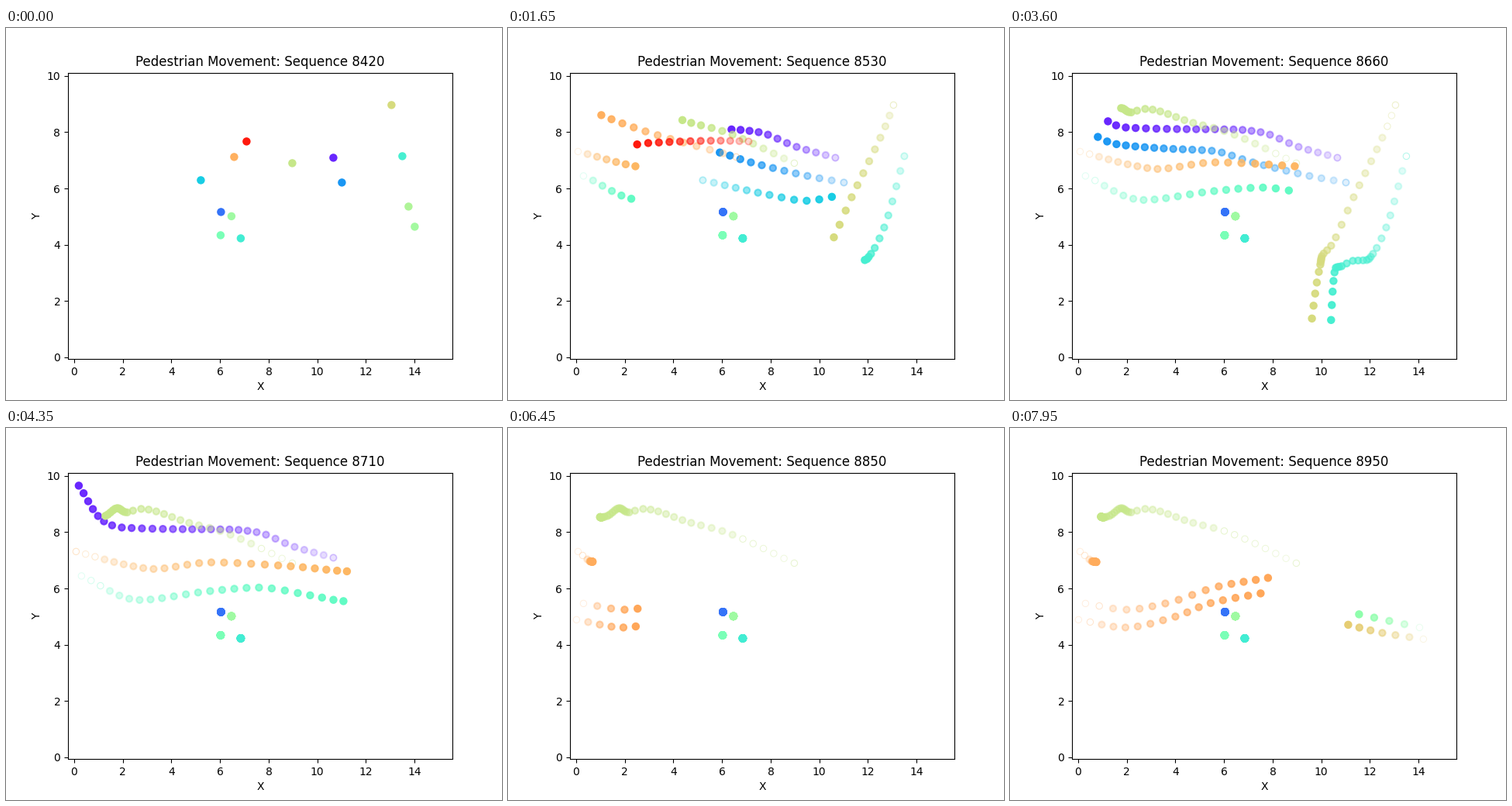
Animation of 640x480 px, one loop 8 s. Source, as a matplotlib script:

```python
import numpy as np
import matplotlib.pyplot as plt
from matplotlib.animation import FuncAnimation

STEPS, TICKS_PER_STEP = 54, 3
FIRST_ID, ID_STEP = 8420, 10
FAINT = 0.11  # paler fills than this leave only an outline


def to_data(px, py):
    """Stage pixels (y down) to axis units."""
    return (np.asarray(px) - 87.9) / 31.38, (424.85 - np.asarray(py)) / 36.3


def glide(t, knots, values):
    """Cubic curve through the knots that never overshoots them."""
    h = np.diff(knots)
    rate = np.diff(values) / h
    total = rate[:-1] + rate[1:]
    inner = 2 * np.maximum(rate[:-1] * rate[1:], 0) / np.where(total == 0, 1, total)
    slope = np.concatenate([rate[:1], inner, rate[-1:]])
    i = np.clip(np.searchsorted(knots, t, side="right") - 1, 0, len(h) - 1)
    u = (t - knots[i]) / h[i]
    return (values[i] + (values[i + 1] - values[i]) * u * u * (3 - 2 * u)
            + h[i] * u * (1 - u) * (slope[i] * (1 - u) - slope[i + 1] * u))


class Walker:
    """A pedestrian passing a few (step, x, y) turning points."""

    def __init__(self, hue, *turns):
        knots, px, py = np.array(turns, float).T
        self.start, self.end = int(knots[0]), int(knots[-1])
        t = np.arange(self.start, self.end + 1)
        self.path = np.column_stack(
            to_data(glide(t, knots, px) + 0.4, glide(t, knots, py) + 0.4))
        # Walkers in the opening step have that position recorded twice.
        self.extra = int(self.start == 0)
        if self.extra:
            self.path = np.vstack([self.path[:1], self.path])
        self.color = np.array(plt.cm.rainbow(hue))

    def trail(self, step):
        points = self.path[:step - self.start + 1 + self.extra]
        alpha = np.linspace(0.1, 1, len(points))
        faint = alpha * (1 - self.color[:3].min()) < FAINT
        fill, edge = np.tile(self.color, (2, len(points), 1))
        fill[:, 3] = np.where(faint, 0, alpha)
        edge[:, 3] = np.where(faint, 1 - (1 - alpha) ** 2, alpha)
        return points, fill, edge, np.where(faint, 0.75, 1.5)


def standing(hue, x, y):
    return Walker(hue, (0, x, y), (STEPS - 1, x, y))


walkers = [
    Walker(0.05, (0, 422, 167), (4, 372, 153), (8, 323, 134), (11, 288, 130.5),
           (17, 215, 130), (22, 149, 128), (24, 126, 120), (29, 93.5, 74)),
    standing(0.15, 277, 237),
    Walker(0.2, (0, 433, 199), (3, 386, 190.5), (8, 313, 173), (12, 260, 158),
           (17, 198, 155), (22, 137, 149.5), (26, 89, 127)),
    Walker(0.3, (0, 251, 196), (6, 337, 215), (9, 385, 222.5), (12, 434, 215),
           (14, 468, 213.5), (20, 571, 218)),
    standing(0.38, 302.5, 271),
    Walker(0.39, (0, 511, 165), (5, 485, 257), (8, 468, 291), (11, 460, 299),
           (14, 442, 300), (16, 427.5, 307), (19, 420, 309), (21, 417, 326),
           (26, 412, 415)),
    standing(0.49, 276.5, 267),
    standing(0.56, 290.5, 242.5),
    Walker(0.57, (0, 527, 256), (2, 563, 254)),
    Walker(0.59, (0, 519, 230), (3, 564, 228)),
    Walker(0.64, (0, 369, 174), (7, 276, 132.5), (10, 236, 122), (16, 174, 104),
           (18, 156, 108.5), (24, 143, 103), (29, 128, 113), (31, 121, 115),
           (53, 117, 114)),
    Walker(0.67, (0, 497, 99), (2, 486.5, 126.5), (8, 443, 218), (12, 414, 280.5),
           (15, 402, 294), (19, 400, 305), (21, 395.5, 328), (27, 383, 425)),
    Walker(0.755, (0, 294, 166), (7, 177, 133), (11, 120, 112), (14, 86, 96)),
    Walker(0.965, (0, 310, 146), (3, 274, 145), (10, 180.5, 148), (12, 152, 153),
           (17, 85, 181)),
    Walker(0.745, (5, 90, 159), (11, 164, 178), (13, 190, 181.5), (18, 264.5, 173),
           (24, 367, 178), (29, 439.5, 184.5), (42, 571, 188)),
    Walker(0.445, (6, 97, 190.5), (12, 172, 221.5), (18, 263, 210), (22, 326, 205.5),
           (26, 392, 215.5), (29, 435, 223), (42, 562, 228)),
    Walker(0.765, (29, 90, 159), (32, 105, 171.5), (53, 111, 172.5)),
    Walker(0.77, (38, 88, 247), (42, 148.5, 257), (46, 213, 243), (49, 258.5, 225.5),
           (53, 323, 213)),
    Walker(0.77, (39, 97, 226), (42, 150, 234), (45, 200, 226), (49, 269, 204),
           (53, 332.5, 193)),
    Walker(0.7, (47, 533, 272), (50, 480, 264), (53, 436, 253.5)),
    Walker(0.53, (49, 528, 257), (53, 450, 240)),
]

fig, ax = plt.subplots(figsize=(6.4, 4.8), dpi=100)
x_limits, y_limits = to_data([80, 576], [427.2, 57.6])
ax.set(xlim=x_limits, ylim=y_limits, xlabel="X", ylabel="Y")
title = ax.set_title("")
dots = ax.scatter([], [])


def update(tick):
    step = tick // TICKS_PER_STEP
    trails = [w.trail(step) for w in walkers if w.start <= step <= w.end]
    points, fill, edge, widths = (np.concatenate(part) for part in zip(*trails))
    dots.set_offsets(points)
    dots.set(facecolor=fill, edgecolor=edge, linewidth=widths)
    title.set_text(f"Pedestrian Movement: Sequence {FIRST_ID + ID_STEP * step}")
    return dots, title


anim = FuncAnimation(fig, update, frames=160, interval=50, repeat=True,
                     repeat_delay=0, blit=False)
plt.show()
```
